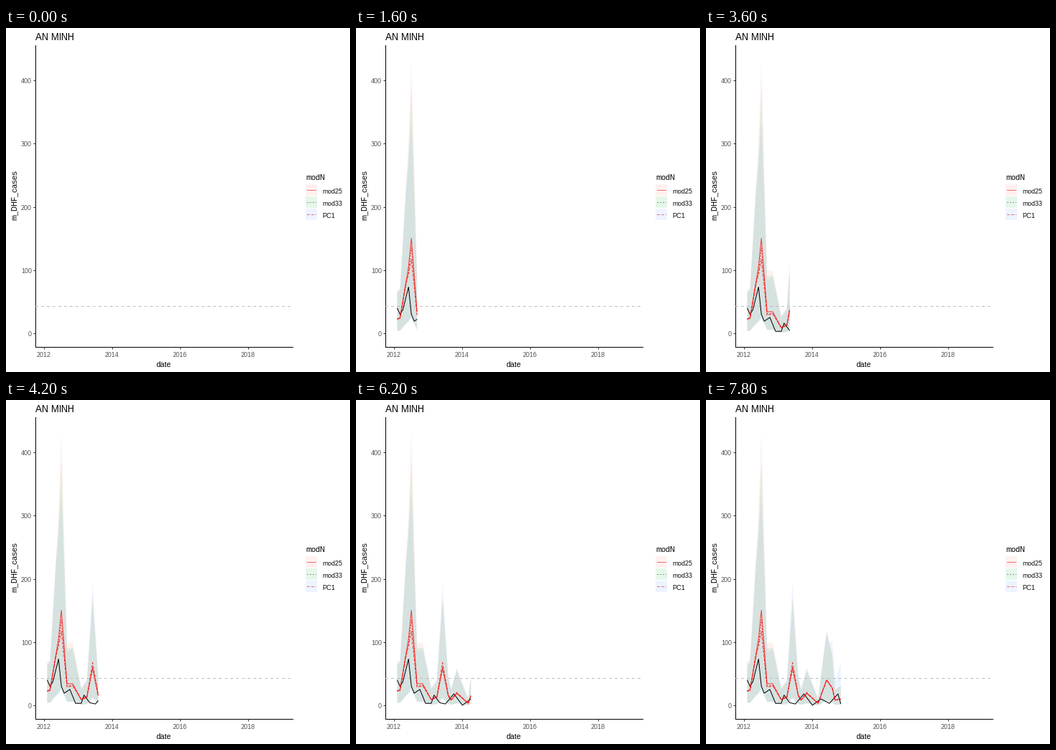
A matplotlib script for the animation above (8 s loop, 480x480 px).

```python
import numpy as np
import matplotlib.pyplot as plt
from matplotlib.animation import FuncAnimation
from matplotlib.patches import Polygon, Rectangle

plt.rcParams.update({
    "font.family": "Liberation Sans",
    "text.hinting": "no_autohint",
    "text.hinting_factor": 1,
})

SIZE, DPI = 480, 100
PX = 72 / DPI
FRAMES, INTERVAL = 40, 200
LEFT, RIGHT, TOP, BOTTOM = 41.5, 401, 24, 445.5
YEAR = 47.5
N = 34  # February 2012 to November 2014

# (month, cases) turning points; straight lines between them
OBSERVED = [(0, 41), (1, 31), (2, 38), (4, 74), (5, 31), (6, 20), (8, 26),
            (10, 4), (12, 4), (13, 17), (15, 5), (17, 3), (20, 19), (23, 1),
            (26, 11), (29, 4), (32, 19), (33, 3)]
PREDICTED = [(0, 24), (1, 25), (4, 106), (5, 151), (7, 35), (9, 35), (12, 10),
             (14, 14), (16, 61), (18, 16), (19, 9), (21, 20), (25, 4),
             (28, 41), (30, 28), (31, 9), (33, 11)]
PEAKS = [3, 5, 16, 28]

# name: gain at each peak, final spread, fill, key colour, dashes
MODELS = {
    "mod25": ([1, 1, 1, 1], 2.86, "#F8766D", "#FF6A6A", "-"),
    "mod33": ([0.95, 0.9, 0.95, 1], 2.86, "#00BA38", "#96908A", (0, (2, 2))),
    "PC1": ([1, 0.78, 1.12, 1], 6.2, "#619CFF", "#F06E7C", (0, (4, 2))),
}

month = np.arange(N)
xs = 53.5 + YEAR * (month + 1) / 12


def to_y(cases):
    return 426.8 - 0.883 * np.asarray(cases)


def series(points):
    return np.interp(month, *zip(*points))


fig = plt.figure(figsize=(SIZE / DPI, SIZE / DPI), dpi=DPI, facecolor="white")
ax = fig.add_axes([0, 0, 1, 1])
ax.set_xlim(0, SIZE)
ax.set_ylim(SIZE, 0)
ax.axis("off")


def label(x, y, text, size, color="black", ha="left", va="baseline", **kw):
    ax.text(x, y, text, fontsize=size * PX, color=color, ha=ha, va=va, **kw)


def line(x, y, color, style="-", z=3, alpha=1):
    return ax.plot(x, y, color=color, lw=PX, ls=style, alpha=alpha, zorder=z,
                   snap=False, solid_capstyle="butt", dash_capstyle="butt")[0]


# axes
line([LEFT, LEFT], [TOP, BOTTOM + 0.5], "black")
line([LEFT, RIGHT], [BOTTOM, BOTTOM], "black")
for cases in range(0, 401, 100):
    y = np.floor(to_y(cases)) + 0.5
    line([LEFT - 3, LEFT], [y, y], "#333333")
    label(36, y + 3.5, str(cases), 9, "#4D4D4D", "right")
for i, year in enumerate(range(2012, 2019, 2)):
    x = 53.5 + 2 * YEAR * i
    line([x, x], [BOTTOM, BOTTOM + 3], "#333333")
    label(x - 0.5, 459, str(year), 9, "#4D4D4D", "center")
label(41, 17, "AN MINH", 13)
label(220, 473, "date", 11, ha="center")
label(11.5, 233, "m_DHF_cases", 11, ha="center", va="center", rotation=90)
line([41, 400], [388.5, 388.5], "#BEBEBE", (0, (4, 4)))

# legend
label(418, 212, "modN", 11)
for i, (name, (_, _, fill, key, dash)) in enumerate(MODELS.items()):
    top = 218 + 17 * i
    ax.add_patch(Rectangle((418, top), 16, 16, fc=fill, alpha=0.1, lw=0))
    line([420, 433], [top + 8.5] * 2, key, dash)
    label(441, top + 13, name, 9)

# growing series
ribbons = []
curves = [(line([], [], "black", z=4), to_y(series(OBSERVED)))]
for gains, spread, fill, _, dash in MODELS.values():
    mid = series(PREDICTED) * np.interp(month, PEAKS, gains)
    width = np.interp(month, [29, N - 1], [2.86, spread])
    patch = Polygon([[0, 0]] * 3, fc=fill, alpha=0.1, lw=0, zorder=2)
    ax.add_patch(patch)
    ribbons.append((patch, to_y(0.2 * mid), to_y(width * mid)))
    curves.append((line([], [], "red", dash, 5, 0.75), to_y(mid)))


def update(frame):
    # five months revealed in every six frames
    n = (5 * frame + 3) // 6 + 1
    for patch, low, high in ribbons:
        patch.set_visible(n > 1)
        patch.set_xy(np.column_stack([
            np.r_[xs[:n], xs[:n][::-1]],
            np.r_[high[:n], low[:n][::-1]]]))
    for curve, ys in curves:
        curve.set_visible(n > 1)
        curve.set_data(xs[:n], ys[:n])
    return [p for p, *_ in ribbons] + [c for c, _ in curves]


anim = FuncAnimation(fig, update, frames=FRAMES, interval=INTERVAL,
                     repeat=True, repeat_delay=0, blit=False)
plt.show()
```
